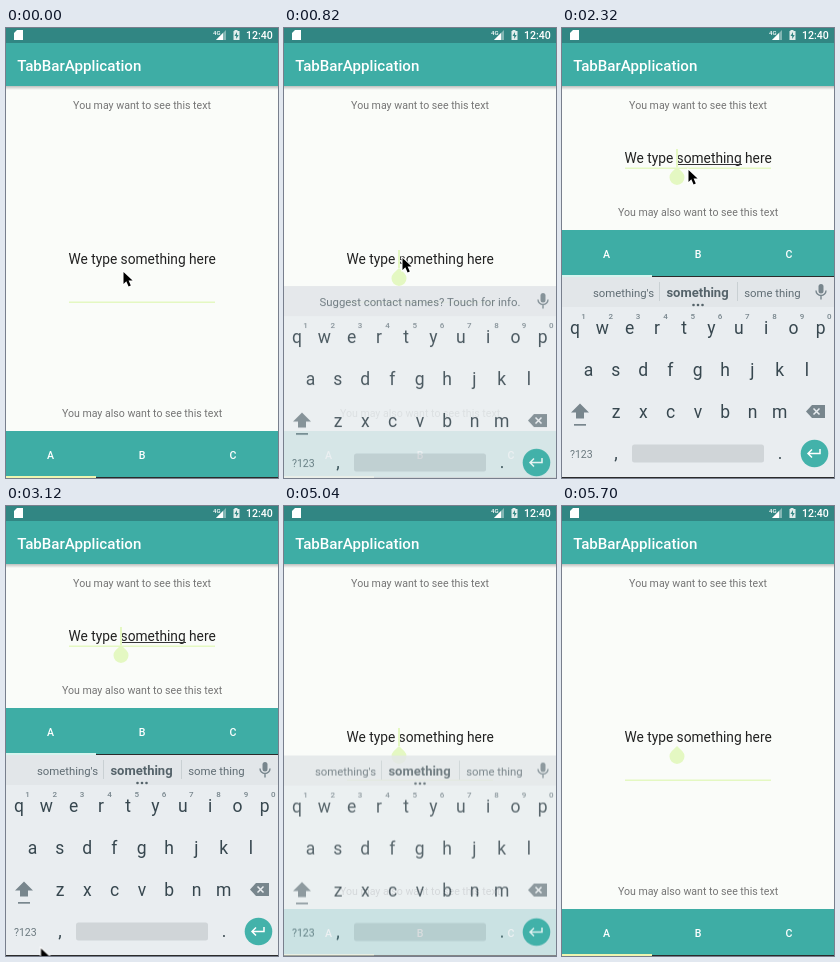
Animation, 272 px wide and 450 px high, one loop 6.08 s. Source, as an HTML page:

```html
<!DOCTYPE html>
<html lang="en">
<head>
<meta charset="utf-8">
<title>Keyboard over tab bar</title>
<style>
html, body { margin: 0; width: 100%; height: 100%; overflow: hidden; background: #fafcf9; }
svg { display: block; width: 100vw; height: 100vh; }
text { font-family: Roboto, sans-serif; white-space: pre; }
.mid { text-anchor: middle; }
.medium { font-weight: 500; fill: #fff; }
.note { font-size: 10.58px; fill: #757575; text-anchor: middle; }
.key { font-size: 17.5px; fill: #37474f; text-anchor: middle; }
.digit { font-size: 8px; fill: #78868d; text-anchor: middle; font-weight: 500; }
.hint { font-size: 11.35px; fill: #606d74; text-anchor: middle; }
.icon { fill: #78868d; }
.accent { fill: #e4f8c2; }

.field, .line, .lower, .tab, .caret, .handle, .word, .ask, .offer { animation: 6080ms step-end infinite; }
.field { animation-name: field; }
.line { animation-name: line; }
.lower { animation-name: lower; }
.tab { animation-name: tab; }
.caret { animation-name: caret; }
.handle { animation-name: handle; }
.word { animation-name: word; }
.ask { animation-name: ask; }
.offer { animation-name: offer; }
.board { animation: slide 6080ms linear infinite, fade 6080ms linear infinite; }
.mouse { animation: mouse 6080ms ease-in-out infinite; }

@keyframes field { 0%, 82.24% { transform: none } 14.8% { transform: translateY(-101px) } }
@keyframes line { 0%, 82.24% { transform: none } 14.8% { transform: translateY(-134px) } }
@keyframes lower { 0%, 82.24% { transform: none } 14.8% { transform: translateY(-201px) } }
@keyframes tab { 0%, 82.24% { fill: #eef5b0 } 14.8% { fill: #d6f4ee } }
@keyframes handle { 0% { opacity: 0 } 8.88%, 100% { opacity: 1 } }
@keyframes caret {
  0%, 19.74%, 40.4%, 63.49%, 92.11%, 100% { opacity: 0 }
  8.88%, 28.29%, 49.34%, 73.36% { opacity: 1 }
}
@keyframes word { 0%, 82.24% { opacity: 0 } 16.45% { opacity: 1 } }
@keyframes ask { 0% { opacity: 1 } 16.45%, 100% { opacity: 0 } }
@keyframes offer { 0% { opacity: 0 } 16.45%, 100% { opacity: 1 } }
@keyframes slide {
  0% { transform: translateY(84px) }
  10.86% { transform: translateY(84px); animation-timing-function: cubic-bezier(.5,1,.89,1) }
  14.8% { transform: none }
  82.24% { transform: none; animation-timing-function: cubic-bezier(.32,0,.67,0) }
  86.18%, 100% { transform: translateY(100px) }
}
@keyframes fade {
  0% { opacity: 0 }
  10.86% { opacity: 0; animation-timing-function: cubic-bezier(.5,1,.89,1) }
  14.8%, 82.24% { opacity: 1 }
  86.18%, 100% { opacity: 0 }
}
@keyframes mouse {
  0%, .99% { transform: translate(117px,243px) }
  5.26%, 30.26% { transform: translate(118px,229px) }
  38.1%, 40.46% { transform: translate(126px,141px) }
  45.72%, 49.34% { transform: translate(32px,438px) }
  55.92%, 100% { transform: translate(45px,456px) }
}
</style>
</head>
<body>
<svg viewBox="0 0 272 450">
  <defs>
    <linearGradient id="shade" x2="0" y2="1">
      <stop stop-color="#000" stop-opacity=".24"/>
      <stop offset="1" stop-color="#000" stop-opacity="0"/>
    </linearGradient>
  </defs>
  <rect width="272" height="450" fill="#fafcf9"/>
  <rect y="58" width="272" height="4" fill="url(#shade)"/>
  <rect y="14" width="272" height="44" fill="#3eada5"/>
  <rect width="272" height="15" fill="#318683"/>

  <path d="M11 2h6v10H8V5z" fill="#fff"/>
  <text class="medium" x="207" y="6.5" font-size="6">4G</text>
  <path d="M220 2v10h-10z" fill="#fff" opacity=".4"/>
  <path d="M217 5v7h-7z" fill="#fff"/>
  <path d="M228.500 2h3v1h2v9h-6V3h1z" fill="#fff" opacity=".85"/>
  <path d="M231 4l-2.500 4h1.700v3l2.500-4h-1.700z" fill="#318683"/>
  <text class="medium" x="240" y="10.500" font-size="10.58">12:40</text>
  <text class="medium" x="11.200" y="42.500" font-size="15.11">TabBarApplication</text>

  <text class="note" x="136" y="81">You may want to see this text</text>

  <rect class="line accent" x="63" y="273.500" width="146" height="1.500"/>
  <g class="field">
    <text x="62.500" y="235.500" font-size="13.75" fill="#212121">We type something here</text>
    <rect class="word" x="115" y="237" width="65" height="1" fill="#333"/>
    <rect class="caret accent" x="114" y="222" width="2" height="18"/>
    <path class="handle accent" d="M115 240l5.400 5.300a7.500 7.500 0 1 1-10.800 0z"/>
  </g>
  <g class="lower">
    <text class="note" x="136" y="389">You may also want to see this text</text>
    <rect y="403" width="272" height="46" fill="#3eada5"/>
    <rect y="449" width="272" height="1" fill="#2b2b2b"/>
    <rect class="tab" y="448" width="90" height="2"/>
    <g class="medium mid" font-size="10.58">
      <text x="44.500" y="431">A</text><text x="136" y="431">B</text><text x="227" y="431">C</text>
    </g>
  </g>

  <g class="board">
    <rect y="249" width="272" height="201" fill="#e9edf0"/>
    <rect y="249" width="272" height="30" fill="#e2e6e9"/>
    <rect y="449" width="272" height="1" fill="#2b2b2b"/>
    <text class="ask hint" x="136" y="268.500">Suggest contact names? Touch for info.</text>
    <g class="offer">
      <path d="M97.500 254v19M175.500 254v19" stroke="#c9d0d3"/>
      <text class="hint" x="61.500" y="269">something's</text>
      <text class="hint" x="135.500" y="269" style="font-size:13px;font-weight:700;fill:#55636a">something</text>
      <text class="hint" x="210.500" y="269">some thing</text>
      <g fill="#55636a"><circle cx="131.500" cy="277" r="1.300"/><circle cx="136" cy="277" r="1.300"/><circle cx="140.500" cy="277" r="1.300"/></g>
    </g>
    <rect class="icon" x="256.500" y="256" width="5" height="9.500" rx="2.500"/>
    <path d="M254 262.500a5 5 0 0 0 10 0M259 267.500v4" fill="none" stroke="#78868d" stroke-width="1.400"/>

    <g id="keys"></g>

    <path class="icon" d="M18 375.500l9 9h-5v6h-8v-6h-5z"/>
    <rect class="icon" x="12" y="396" width="12" height="1.700"/>
    <path class="icon" d="M250 377h13v13h-13l-6-6.500z"/>
    <path d="M251.500 380.500l6 6M257.500 380.500l-6 6" stroke="#e9edf0" stroke-width="1.500"/>
    <text x="8" y="429.500" font-size="10.500" fill="#6b797f">?123</text>
    <text class="key" x="54" y="431">,</text>
    <rect x="70" y="416.500" width="132" height="18" rx="2.500" fill="#d0d5d8"/>
    <text class="key" x="218" y="431">.</text>
    <circle cx="252.500" cy="425.500" r="13.800" fill="#43b2aa"/>
    <path d="M258 421v4.500h-11.500M250 421.500l-4 4 4 4" fill="none" stroke="#fff" stroke-width="1.500"/>
  </g>

  <path class="mouse" d="M.5 1v12l2.800-2.700 2.300 5.200 2.200-1-2.200-5h4z" fill="#000" stroke="#fff" stroke-width="2" paint-order="stroke"/>
</svg>
<script>
const keys = document.getElementById('keys');

function addKey(type, x, y, label) {
  const key = document.createElementNS('http://www.w3.org/2000/svg', 'text');
  key.setAttribute('class', type);
  key.setAttribute('x', x);
  key.setAttribute('y', y);
  key.textContent = label;
  keys.append(key);
}

const rows = [['qwertyuiop', 13], ['asdfghjkl', 26.5], ['zxcvbnm', 54]];
rows.forEach(([letters, left], row) => {
  [...letters].forEach((letter, i) => {
    const x = left + i * 27.3;
    addKey('key', x, 305.5 + row * 42, letter);
    if (row === 0) addKey('digit', x + 8.5, 290.5, (i + 1) % 10);
  });
});
</script>
</body>
</html>
```
